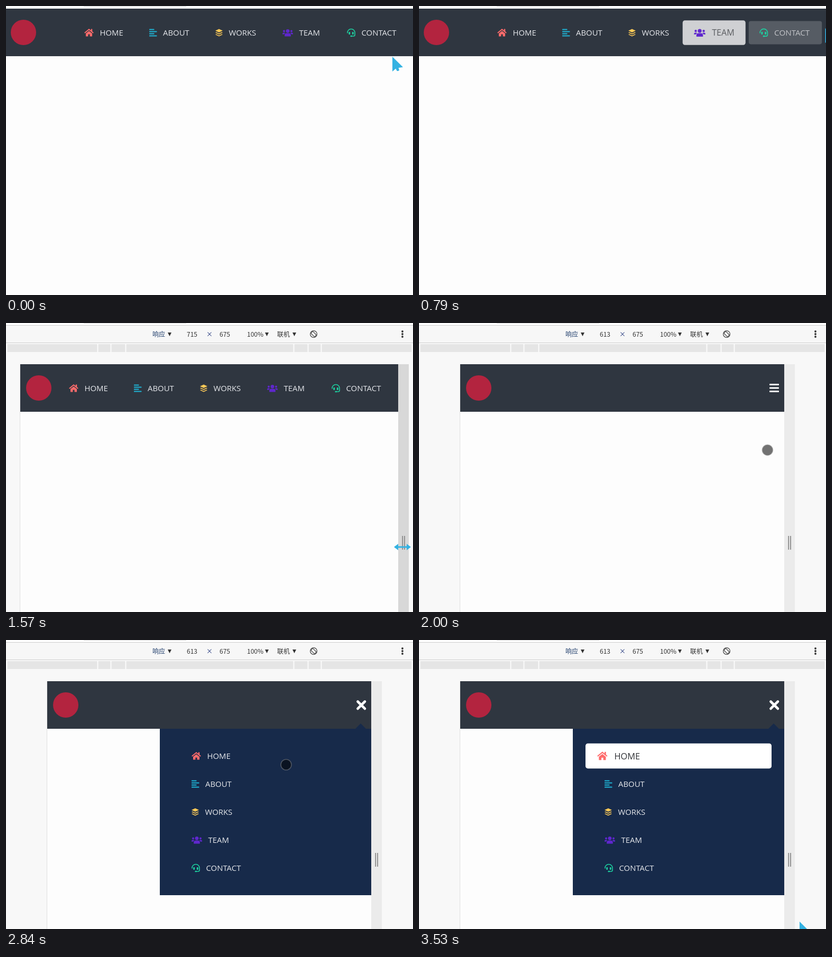
Animation, 770 px wide and 547 px high, one loop 3.58 s. Source, as an HTML page:

```html
<!DOCTYPE html>
<html lang="en">
<head>
<meta charset="utf-8">
<title>Responsive navigation</title>
<style>
  html, body { margin: 0; width: 100%; height: 100%; overflow: hidden; background: #fdfdfd; }
  svg { display: block; width: 100%; height: 100%; }
  .label { font: 14.9px "Open Sans", "Noto Sans", sans-serif; }
  .tool { font: 12px "Noto Sans CJK SC", "Noto Sans CJK", "Noto Sans", sans-serif; fill: #333; }
</style>
</head>
<body>
<svg id="stage" viewBox="0 0 770 547" xmlns="http://www.w3.org/2000/svg"></svg>
<script>
const LOOP = 3580, DEVICE_AT = 960, MENU_AT = 2460, BREAKPOINT = 700;
const BLUE = '#33b2e2', NAV = '#2f3640', DROP = '#172a4a';

const rect = (x, y, w, h, fill, extra = '') =>
  `<rect x="${x}" y="${y}" width="${w}" height="${h}" fill="${fill}" ${extra}/>`;
const path = (d, extra = '') => `<path d="${d}" ${extra}/>`;

const side = path('M0 11V10a2 2 0 0 1 2-2h2a2 2 0 0 1 1.4.6A5 5 0 0 0 3.4 11z') +
  '<circle cx="3" cy="5" r="2"/>';
const layer = y => path(`M0 ${y}l1.7-.8 5.3 2.5 5.3-2.5 1.7.8-7 3.4z`);

const icons = {
  home: path('M.8 8.4 9 1.8l8.2 6.6', 'fill="none" stroke="currentColor" stroke-width="1.9"') +
    path('M3 9.4 9 4.7l6 4.7V15h-4.4v-4H7.4v4H3z') + path('M12.8 1h2.4v5.4l-2.4-2z'),
  list: [1, 5, 9, 13].map((y, i) => rect(0, y, i % 2 ? 14.5 : 9.5, 2, 'currentColor', 'rx=".4"')).join(''),
  stack: path('M7 1l7 3.2-7 3.2-7-3.2z') + layer(7.9) + layer(11.5),
  users: side + `<g transform="translate(20) scale(-1 1)">${side}</g>` +
    '<circle cx="10" cy="4.8" r="3.4"/>' +
    path('M4.2 15v-2.4A3.6 3.6 0 0 1 7.8 9h4.4a3.6 3.6 0 0 1 3.6 3.6V15z'),
  headset: path('M1 9V8a7 7 0 0 1 14 0v4a2.5 2.5 0 0 1-2.5 2.5H9',
    'fill="none" stroke="currentColor" stroke-width="1.6"') +
    rect(3.3, 6.4, 2.8, 5, 'currentColor', 'rx="1.2"') +
    rect(9.9, 6.4, 2.8, 5, 'currentColor', 'rx="1.2"') +
    rect(6.4, 13.2, 3.6, 2.6, 'currentColor', 'rx="1.2"')
};

// label, icon, icon width, colour, x in the bar, padded width
const items = [
  ['HOME', 'home', 18, '#ff6b6b', 148, 114],
  ['ABOUT', 'list', 14.5, '#1fb6d8', 271, 115],
  ['WORKS', 'stack', 14, '#feca57', 396, 118],
  ['TEAM', 'users', 20, '#5f27cd', 523, 110.5],
  ['CONTACT', 'headset', 16, '#1dd1a1', 645, 136]
];

function entry(id, [label, icon, size, color], x, cy, width) {
  return `<g id="${id}" data-cx="${x - 20 + width / 2}" data-cy="${cy}">` +
    rect(x - 20, cy - 21.5, width, 43, '#fff', 'rx="4" opacity="0"') +
    `<g transform="translate(${x} ${cy - 8})" fill="${color}" color="${color}">${icons[icon]}</g>` +
    `<text class="label" x="${x + size + 11.5}" y="${cy + 5.5}">${label}</text></g>`;
}

const tool = (x, s, extra = '') => `<text class="tool" x="${x}" y="25.5" ${extra}>${s}</text>`;
const caret = x => path(`M${x} 18h7l-3.5 7z`, 'fill="#333"');
const ruler = [[2, 172], [174, 197], [199, 225], [227, 543], [545, 570], [572, 595], [597, 767]];

const toolbar = `<g id="tools">` +
  rect(0, 4, 770, 543, '#f8f8f8') + rect(0, 4, 770, 1, '#ccc') +
  rect(0, 5, 770, 32, '#f7f7f7') + rect(0, 37, 770, 1, '#ccc') + rect(0, 38, 770, 18, '#fafafa') +
  ruler.map(([a, b]) => rect(a + .5, 40, b - a, 15, '#e5e5e5')).join('') +
  tool(277, '响应', 'style="fill:#24406e"') + caret(306) +
  tool(342, '<tspan id="size">715</tspan>') + tool(379, '×', 'style="fill:#1b2f78"') + tool(404, '675') +
  tool(456, '100%') + caret(490) + tool(513, '联机') + caret(542) +
  `<g fill="none" stroke="#444" stroke-width="1.2"><circle cx="582" cy="21" r="6.4"/>
   <rect x="579.4" y="16" width="5.2" height="10" rx="1" transform="rotate(-45 582 21)"/></g>` +
  [16, 21, 26].map(y => `<circle cx="750" cy="${y}" r="1.9" fill="#333"/>`).join('') +
  `<g id="grip">` + rect(0, 78, 20, 469, '#ebebeb', 'id="strip"') +
  rect(7.4, 403, 1.7, 26, '#858585') + rect(11.2, 403, 1.7, 26, '#858585') + `</g></g>`;

const stage = document.getElementById('stage');
stage.innerHTML =
  rect(0, 0, 770, 547, '#fff') + rect(147, 0, 194, 1, '#ddd') + toolbar +
  rect(0, 0, 0, 547, '#fdfdfd', 'id="page"') + rect(0, 0, 0, 90, NAV, 'id="bar"') +
  rect(0, 78, 1, 469, '#e0e0e0', 'id="edge"') +
  `<circle id="mark" r="24" fill="#b3243f"/>` +
  `<g id="links">${items.map((it, i) => entry('link' + i, it, it[4], 50.5, it[5])).join('')}</g>` +
  `<g id="bars">${[115, 121.5, 128].map(y => rect(663, y, 18, 3, '#fff', 'rx="1"')).join('')}</g>` +
  `<g id="menu">` + rect(291, 168, 400, 315, DROP) + path('M661 168l10-10 10 10z', `fill="${DROP}"`) +
  path('M665.5 116.5l13.4 13.4m0-13.4l-13.4 13.4',
    'stroke="#fff" stroke-width="4.8" stroke-linecap="round"') +
  items.map((it, i) => entry('row' + i, it, 351, 219.5 + 53 * i, 320)).join('') +
  rect(663, 78, 18, 90, '#33b5e5', 'id="tap"') + `</g>` +
  `<g id="cursor" fill="${BLUE}">` +
  path('M0 0V28L6.4 22.4 8.4 26.4Q10.5 28 13 25.4L11.6 21 20 19.8z', 'id="arrow"') +
  path('M-2 1Q0-1 2.2 1L4.5 11.5Q8 9.5 9.5 12 12 10.5 13 13.2 15.5 12.6 16 15.5 16.4 22 13.6 27L13 33H1L0 28-8 19Q-8.4 15.5-4.6 16.4L-1.2 19z',
    'id="hand"') +
  path('M-16 0l8-6v4.4H8V-6l8 6-8 6V1.6H-8V6z', 'id="resize"') +
  `<circle id="touch" r="10" fill="#000" fill-opacity=".55" stroke="#888" stroke-opacity=".5" stroke-width="1.6"/></g>`;

const el = {};
stage.querySelectorAll('[id]').forEach(n => el[n.id] = n);

const clamp = v => Math.max(0, Math.min(1, v));
const set = (n, attrs) => { for (const k in attrs) n.setAttribute(k, attrs[k]); };
const show = (n, on) => n.setAttribute('display', on ? 'inline' : 'none');
const fade = (t, at) => 1 - (1 - clamp((t - at) / 400)) ** 2;
const hover = (t, on, off) => fade(t, on) * (1 - fade(t, off));

// linear path through [time, x, y] points
function along(keys, t) {
  let i = 1;
  while (i < keys.length - 1 && t > keys[i][0]) i++;
  const a = keys[i - 1], b = keys[i], p = clamp((t - a[0]) / (b[0] - a[0]));
  return a.slice(1).map((v, k) => v + (b[k + 1] - v) * p);
}

const track = [
  [50, 731, 96], [135, 726, 72], [300, 690, 56], [420, 620, 49], [510, 505, 46], [590, 505, 46],
  [700, 560, 45], [743, 617, 44], [790, 767, 42], [850, 860, 40], [1110, 860, 600],
  [1160, 717, 542], [1270, 738, 470], [1390, 750, 424], [1600, 750, 424], [1880, 699, 424],
  [1960, 672, 290], [2080, 635, 145], [2180, 635, 145], [2280, 654, 132.5], [2560, 654, 132.5],
  [2700, 580, 195], [2840, 530, 236], [3020, 530, 236], [3150, 527, 238], [3250, 540, 255],
  [3400, 640, 405], [3530, 720, 533]
];

function paintEntry(node, a) {
  const { cx, cy } = node.dataset, [box, , text] = node.children;
  const mix = (p, q) => Math.round(p + (q - p) * a);
  set(node, { transform: `translate(${cx} ${cy}) scale(${1 + a / 10}) translate(${-cx} ${-cy})` });
  set(box, { opacity: a });
  set(text, { fill: `rgb(${mix(228, 48)},${mix(230, 50)},${mix(234, 54)})` });
}

function paintCursor(t, device, right) {
  const [x, y] = along(track, t);
  let kind = 'arrow';
  if (!device) {
    if (y < 75 && x > 500 && x < 762) kind = 'hand';
  } else if (x < right) kind = 'touch';
  else if (x < right + 20 && t < 2000) kind = 'resize';
  for (const k of ['arrow', 'hand', 'resize', 'touch']) show(el[k], k === kind);
  set(el.cursor, { transform: `translate(${x} ${y})` });
}

function draw(t) {
  const device = t >= DEVICE_AT, open = t >= MENU_AT;
  const width = device ? Math.round(along([[1600, 715], [1880, 613]], t)[0]) : 773;
  const left = 384.5 - width / 2, right = left + width, top = device ? 78 : 5;
  const wide = width >= BREAKPOINT;

  show(el.tools, device);
  show(el.edge, device);
  el.size.textContent = width;
  set(el.grip, { transform: `translate(${right} 0)` });
  set(el.strip, { fill: t > 1290 && t < 1900 ? '#d8d8d8' : '#ebebeb' });
  set(el.page, { x: left, y: top, width });
  set(el.bar, { x: left, y: top, width });
  set(el.edge, { x: left - 1 });
  set(el.mark, { cx: left + 35, cy: top + 45 });

  show(el.links, wide);
  set(el.links, { transform: `translate(${right - 771} ${top - 5})` });
  show(el.bars, !wide && !open);
  set(el.bars, { transform: `translate(${right - 691} 0)` });
  show(el.menu, open);
  set(el.tap, { opacity: .4 * (1 - clamp((t - 2560) / 200)) });

  const contact = Math.max(hover(t, 135, 420), hover(t, 750, 785));
  items.forEach((_, i) => {
    paintEntry(el['link' + i], i === 3 ? hover(t, 420, 743) : i === 4 ? contact : 0);
    paintEntry(el['row' + i], i === 0 ? fade(t, 3020) : 0);
  });
  paintCursor(t, device, right);
}

function tick() {
  draw(performance.now() % LOOP);
  requestAnimationFrame(tick);
}
tick();
</script>
</body>
</html>
```
